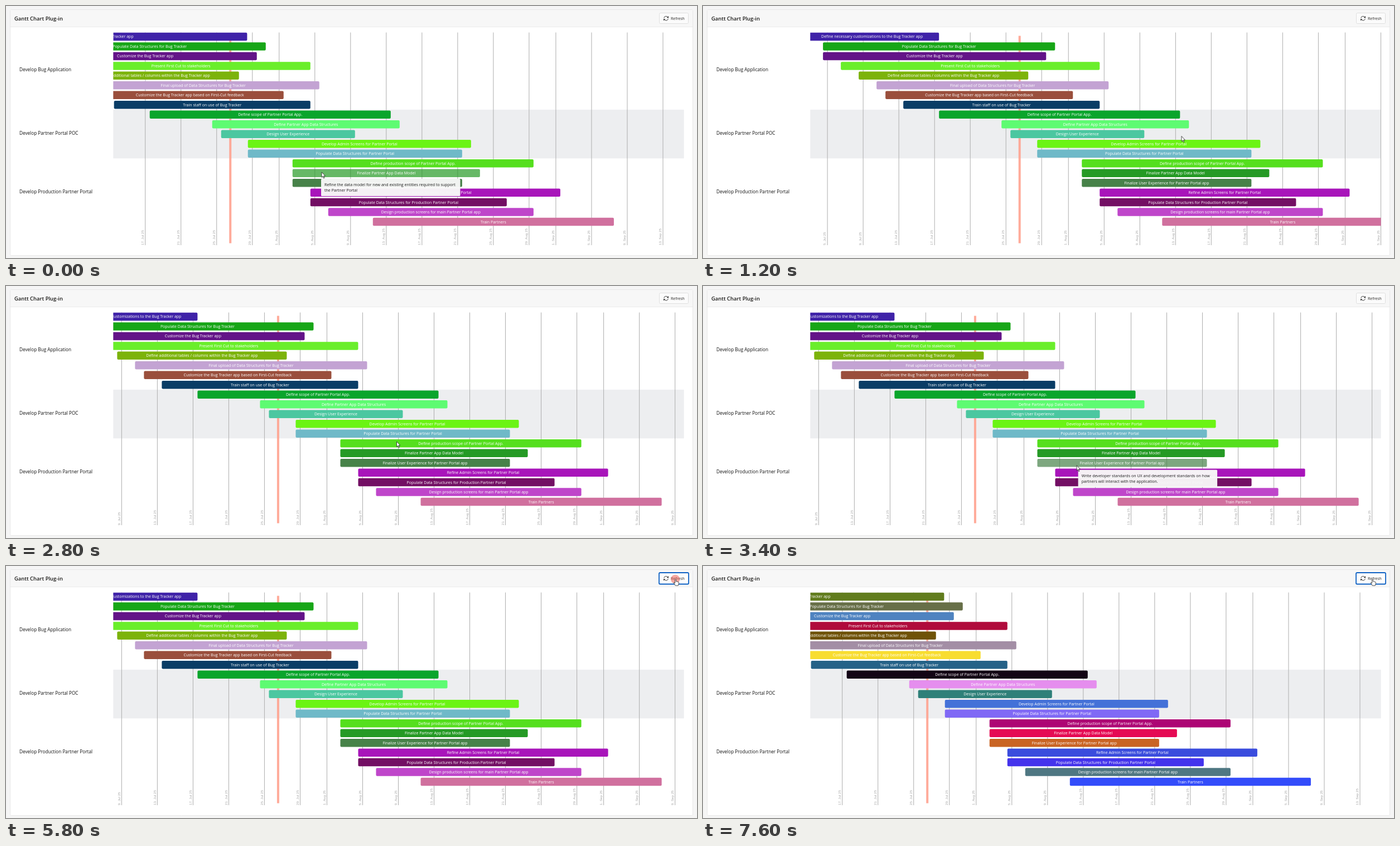
Recreate the animation shown at these times as an HTML page with a canvas. Size 1239x452 px, loop 8.4 s.

```html
<!DOCTYPE html>
<html lang="en">
<head>
<meta charset="utf-8">
<title>Gantt Chart Plug-in</title>
<style>
html, body { margin: 0; width: 100%; height: 100%; overflow: hidden; background: #f5f5f5; }
canvas { display: block; width: 1239px; height: 452px; }
</style>
</head>
<body>
<canvas id="stage"></canvas>
<script>
const W = 1239, H = 452, LOOP = 8400, STEP = 200;
const LEFT = 192.3, RIGHT = 1215.6, TOP = 46.1, ROW = 17.48;
const DAY = 16.005, ORIGIN = -6.4, TODAY = 25.53;
const SANS = '"Open Sans", "Noto Sans", sans-serif';
const AXIS = '"Liberation Sans", Arial, sans-serif';

const canvas = document.getElementById('stage');
const ctx = canvas.getContext('2d');
const dpr = window.devicePixelRatio || 1;
canvas.width = W * dpr;
canvas.height = H * dpr;

// label, first day, last day (days after 1 July)
const tasks = [
  ['Define necessary customizations to the Bug Tracker app', 1, 16],
  ['Populate Data Structures for Bug Tracker', 3, 29],
  ['Customize the Bug Tracker app', 3, 28],
  ['Present First Cut to stakeholders', 5, 34],
  ['Define additional tables / columns within the Bug Tracker app', 7, 26],
  ['Final upload of Data Structures for Bug Tracker', 9, 35],
  ['Customize the Bug Tracker app based on First-Cut feedback', 10, 31],
  ['Train staff on use of Bug Tracker', 12, 34],
  ['Define scope of Partner Portal App.', 16, 43],
  ['Define Partner App Data Structures', 23, 44],
  ['Design User Experience', 24, 39],
  ['Develop Admin Screens for Partner Portal', 27, 52],
  ['Populate Data Structures for Partner Portal', 27, 51],
  ['Define production scope of Partner Portal App.', 32, 59],
  ['Finalize Partner App Data Model', 32, 53],
  ['Finalize User Experience for Partner Portal app', 32, 51],
  ['Refine Admin Screens for Partner Portal', 34, 62],
  ['Populate Data Structures for Production Partner Portal', 34, 56],
  ['Design production screens for main Partner Portal app', 36, 59],
  ['Train Partners', 41, 68]
];

const groups = [
  ['Develop Bug Application', 114.3],
  ['Develop Partner Portal POC', 228.3],
  ['Develop Production Partner Portal', 333.3]
];

const notes = {
  11: ['Develop the screens needed to maintain all of the base tables for the', 'Partner Portal app.'],
  14: ['Refine the data model for new and existing entities required to support', 'the Partner Portal'],
  15: ['Write developer standards on UX and development standards on how', 'partners will interact with the application.'],
  16: ['Refine the screens needed to maintain all of the base tables for the', 'Partner Portal app.']
};

const split = s => s.split(' ').map(c => '#' + c);
const firstColors = split('3f22a8 17a617 631488 6aee2b 7cb30b c3a3d3 9a4f3c 0a3d66 0aa52c 5efb72 4bc7a0 6bf414 6fb9c8 55df1e 259a25 478249 a815ba 730f64 bf46ca d0709e');
const lastColors = split('617c1d 676f48 4f83c0 b00b3c 6f5207 a38ea5 f8dd30 256288 130515 e58eee 2f8079 4471d8 8069f5 ad0574 e50a54 c96423 3a4cdd 4433ec 4f7782 334cfa');
const midColors = randomColors(11);

// time, pointer x, pointer y, chart shift
const path = [
  [0, 566, 298, 0],
  [600, 656, 265, 0],
  [1200, 858, 233.5, 165.5],
  [1800, 865.5, 251, 210],
  [2200, 715, 276, 85.7],
  [2600, 715, 276, 85.7],
  [2800, 700.5, 279, 85.7],
  [3600, 660, 336, 85.7],
  [4200, 660, 336, 85.7],
  [4400, 663.5, 317.5, 85.7],
  [5200, 1200.5, 23.5, 85.7],
  [5800, 1200.5, 23.5, 85.7],
  [6000, 1200.5, 23.5, 0],
  [LOOP, 1200.5, 23.5, 0]
];

// from, to, task, note offset from the pointer
const hovers = [
  [0, 200, 14, -1, 12],
  [1800, 2000, 11, -236.5, -22.5],
  [3200, 3400, 14, 2.5, 8],
  [3400, 3600, 15, 2.5, 8],
  [3600, 4400, 16, 2.5, 8],
  [4400, 4600, 15, 2.5, 8]
];

function randomColors(seed) {
  return tasks.map(() => {
    const channel = () => (seed = seed * 16807 % 2147483647) % 256;
    channel();
    return `rgb(${channel()},${channel()},${channel()})`;
  });
}

function poseAt(t) {
  const i = Math.max(1, path.findIndex(k => k[0] > t));
  const a = path[i - 1], b = path[i];
  const u = (t - a[0]) / (b[0] - a[0]);
  const [, x, y, shift] = a.map((v, n) => v + (b[n] - v) * u);
  return { x, y, shift };
}

// Drawn large and scaled down so that glyph advances stay unrounded.
function text(str, x, y, size, color, { align = 'left', font = SANS, weight = 400, turn = 0 } = {}) {
  ctx.save();
  ctx.translate(x, y);
  ctx.rotate(turn);
  ctx.scale(0.1, 0.1);
  ctx.font = `${weight} ${size * 10}px ${font}`;
  ctx.textAlign = align;
  ctx.fillStyle = color;
  ctx.fillText(str, 0, size * 3.55);
  ctx.restore();
}

function rect(x, y, w, h, color) {
  ctx.fillStyle = color;
  ctx.fillRect(x, y, w, h);
}

function box(x, y, w, h, r, fill, stroke, line = 1) {
  ctx.beginPath();
  ctx.roundRect(x, y, w, h, r);
  ctx.fillStyle = fill;
  ctx.fill();
  if (stroke) {
    ctx.strokeStyle = stroke;
    ctx.lineWidth = line;
    ctx.stroke();
  }
}

function poly(points, fill, stroke, line) {
  ctx.beginPath();
  points.forEach(([x, y]) => ctx.lineTo(x, y));
  ctx.closePath();
  ctx.fillStyle = fill;
  ctx.fill();
  if (stroke) {
    ctx.strokeStyle = stroke;
    ctx.lineWidth = line;
    ctx.lineJoin = 'round';
    ctx.stroke();
  }
}

function drawCard() {
  rect(0, 0, W, H, '#f5f5f5');
  box(7.5, 6.5, 1224, 441, 2, '#fff', '#e8e8e8');
  rect(8, 7, 1223, 30, '#f7f7f7');
  rect(8, 37, 1223, 1, '#ebebeb');
  text('Gantt Chart Plug-in', 15, 23, 9.4, '#161513', { weight: 600 });
  groups.forEach(([name, y]) => text(name, 24, y, 8.2, '#111'));
}

function drawButton(focused) {
  if (focused) box(1171, 12, 53, 20.5, 2, '#fdfdfd', '#0f62c4', 1.8);
  else box(1171.5, 12.5, 52, 19, 2, '#fbfbfb', '#dfdfdf');
  ctx.save();
  ctx.translate(1183.5, 22.2);
  for (let i = 0; i < 2; i++) {
    ctx.beginPath();
    ctx.arc(0, 0, 3.7, Math.PI * 1.05, Math.PI * 1.85);
    ctx.strokeStyle = '#333';
    ctx.lineWidth = 0.95;
    ctx.stroke();
    poly([[4.5, -4.2], [4.5, -0.8], [1.3, -1.2]], '#333');
    ctx.rotate(Math.PI);
  }
  ctx.restore();
  text('Refresh', 1192, 22.2, 7, '#2b2a28');
}

function drawGrid(shift) {
  rect(LEFT, TOP + 8 * ROW, RIGHT - LEFT, 5 * ROW, '#edeef0');
  [['Jul', 0], ['Aug', 31], ['Sep', 62]].forEach(([month, start]) => {
    for (let d = 1; d <= 29; d += 4) {
      const x = ORIGIN + shift + (start + d - 1) * DAY;
      if (x < LEFT || x > RIGHT + 1) continue;
      if (x < RIGHT) rect(x - 0.5, 47.5, 1, 381.5, '#adadad');
      text(`${d}. ${month} 25`, x - 5, 429, 6.2, '#a6a6a6', { font: AXIS, turn: -Math.PI / 2 });
    }
  });
  rect(ORIGIN + shift + TODAY * DAY - 2, 53.5, 4, 372, 'rgba(255,160,140,.88)');
}

function drawBars(shift, colors, hovered) {
  ctx.save();
  ctx.beginPath();
  ctx.rect(LEFT, 40, RIGHT - LEFT, 400);
  ctx.clip();
  tasks.forEach(([name, from, to], i) => {
    const x = ORIGIN + shift + (from + 0.5) * DAY;
    const w = (to - from) * DAY;
    const y = TOP + i * ROW + 1.6;
    // At rest the first bar is pushed to the plot edge but keeps its width.
    const left = i === 0 && shift === 0 ? LEFT : x;
    ctx.globalAlpha = i === hovered ? 0.7 : 1;
    box(left, y, w, 14.5, left < LEFT || left === LEFT ? [0, 2, 2, 0] : 2, colors[i]);
    ctx.globalAlpha = 1;
    text(name, x + w / 2, y + 7.3, 7, '#fff', { align: 'center' });
  });
  ctx.restore();
}

function drawNote(lines, x, y) {
  ctx.save();
  ctx.shadowColor = 'rgba(0,0,0,.15)';
  ctx.shadowBlur = 2;
  box(x, y, 249.5, 31, 1.5, 'rgba(249,249,249,.96)');
  ctx.restore();
  lines.forEach((s, i) => text(s, x + 6, y + 10.5 + i * 10, 7.1, '#1c1c1c'));
}

function drawArrow(x, y) {
  ctx.save();
  ctx.translate(x, y);
  poly([[0, 0], [0, 9.4], [2.1, 7.4], [3.6, 10.9], [5, 10.3], [3.5, 6.9], [6.4, 6.8]], '#fff', '#222', 0.8);
  ctx.restore();
}

function drawHand(x, y) {
  ctx.save();
  ctx.translate(x, y);
  poly([[-0.9, 0.6], [0, 0], [0.9, 0.6], [0.9, 4.2], [3.6, 4.6], [5.6, 5.4], [5.9, 6.4],
    [5.6, 9], [4.7, 11.6], [-0.2, 11.6], [-1.8, 9], [-3.4, 6.7], [-2.8, 6], [-0.9, 7.3]], '#fff', '#222', 0.8);
  ctx.restore();
}

function draw(time) {
  const t = Math.floor(time % LOOP / STEP) * STEP;
  const { x, y, shift } = poseAt(t);
  const hover = hovers.find(h => t >= h[0] && t < h[1]);
  const colors = t < 6000 ? firstColors : t < 7600 ? midColors : lastColors;
  const pressed = (t >= 5600 && t < 6000) || (t >= 7200 && t < 7600);

  ctx.setTransform(dpr, 0, 0, dpr, 0, 0);
  drawCard();
  drawButton(t >= 5600);
  drawGrid(shift);
  drawBars(shift, colors, hover && hover[2]);
  if (hover) drawNote(notes[hover[2]], x + hover[3], y + hover[4]);
  if (pressed) {
    ctx.beginPath();
    ctx.arc(1200, 23.7, 8, 0, Math.PI * 2);
    ctx.fillStyle = 'rgba(240,100,90,.55)';
    ctx.fill();
  }
  (t < 5200 ? drawArrow : drawHand)(x, y);
}

const start = performance.now();
(function tick() {
  draw(performance.now() - start);
  requestAnimationFrame(tick);
})();
</script>
</body>
</html>
```
